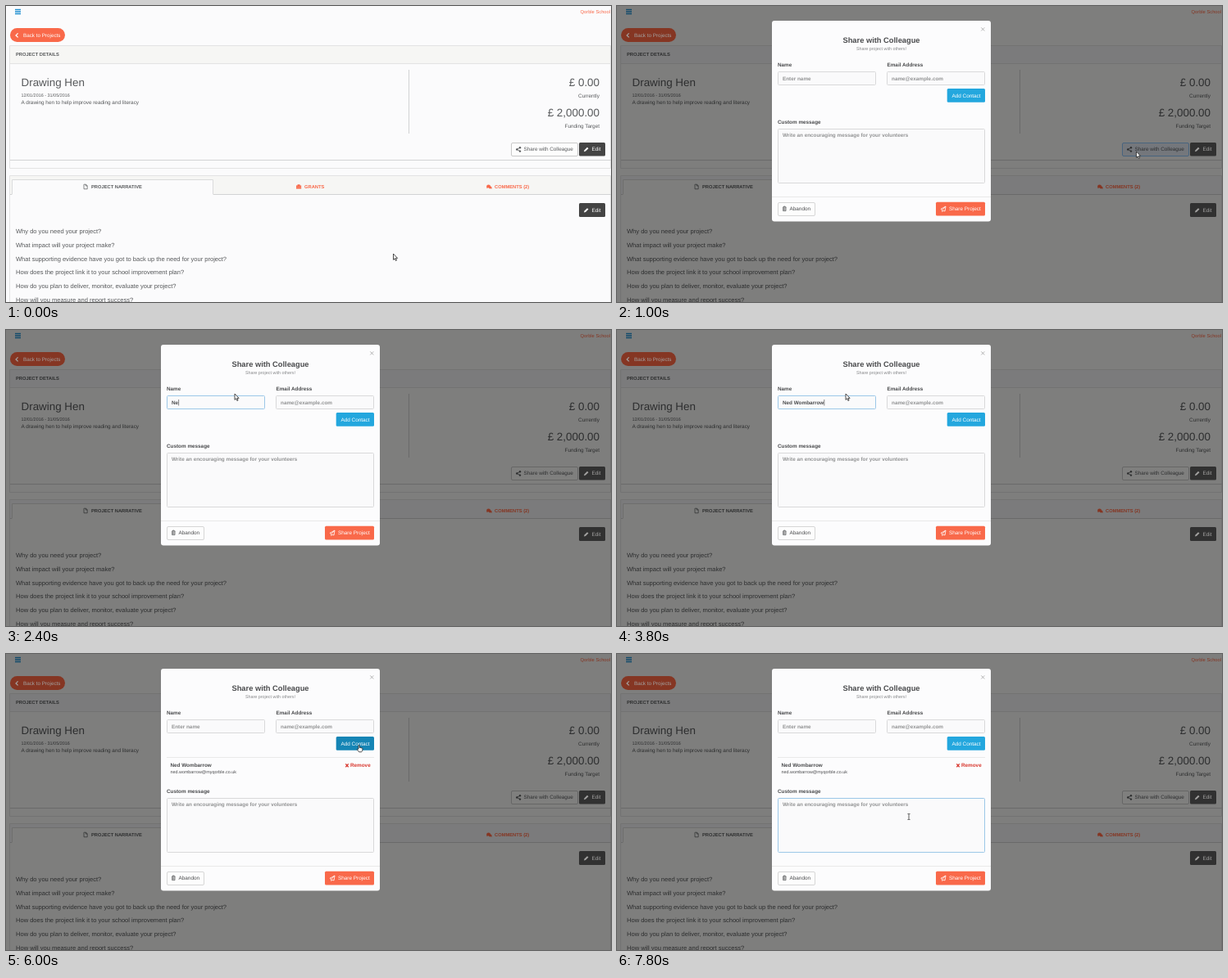
Recreate the animation shown at these times as an HTML page. Size 738 by 362 pixels, loop 8000 ms.

```html
<!DOCTYPE html>
<html lang="en">
<head>
<meta charset="utf-8">
<title>Share a project</title>
<style>
  html, body { margin: 0; width: 100%; height: 100%; overflow: hidden; }
  svg { display: block; width: 738px; height: 362px; }
  text {
    font-family: "Liberation Sans", Arial, sans-serif;
    font-size: 6.4px; fill: var(--ink); text-rendering: geometricPrecision;
  }
  #page {
    --bg: #fbfbfc; --head: #f6f6f4; --line: #e3e3e3; --rule: #d2d3d4;
    --ink: #57595b; --hot: #f9694a; --dark: #444; --label: #fff; --btn: #fdfdfd;
    --edge: #c9c9c9; --menu: #1f8fd0;
  }
  #page.dim {
    --bg: #7e7e7d; --head: #7b7b7c; --line: #727272; --rule: #6a6a6a;
    --ink: #2d2e2f; --hot: #853623; --dark: #313131; --label: #a3a2a1; --btn: #7f7f7e;
    --edge: #666; --menu: #124b6c;
  }
  #page.hover { --btn: #e1e1e1; --edge: #adadad; }
  #page.focus { --btn: #74777c; --edge: #48647f; }
  .bg { fill: var(--bg); }
  .head { fill: var(--head); }
  .line { stroke: var(--line); fill: none; }
  .rule { stroke: var(--rule); fill: none; }
  .hot { fill: var(--hot); }
  .dark { fill: var(--dark); }
  .label { fill: var(--label); }
  .ink { fill: var(--ink); }
  .big { font-size: 13.4px; }
  .ask { font-size: 7.54px; }
  .cap { font-size: 5.75px; font-weight: bold; }
  .tiny { font-size: 5.4px; }
  .bold { font-weight: bold; font-size: 6.35px; }
  .end { text-anchor: end; }
  .mid { text-anchor: middle; }
  #shareBtn { fill: var(--btn); stroke: var(--edge); }
  #modal { --ink: #4a4b4d; --hot: #f9694a; --label: #fff; }
  .field { fill: #fafafb; stroke: #d9d9da; }
  .field.on { stroke: #9cc8e8; }
  .empty { fill: #929394; }
  #addBtn { fill: #23a7de; }
  #addBtn.on { fill: #1585b5; }
  .plain { fill: #fdfdfd; stroke: #d6d6d6; }
  .red { fill: #d8382f; }
  #caret { stroke: #555; stroke-width: .7; }
  .pointer { fill: #fff; stroke: #222; stroke-width: .8; stroke-linejoin: round; }
</style>
</head>
<body>
<svg viewBox="0 0 738 362">
  <defs>
    <path id="pencil" d="M0 6l.6-2L4 .6 5.5 2 2 5.4z"/>
  </defs>

  <g id="page">
    <rect class="bg" width="738" height="362"/>
    <path d="M11 4.5h7M11 7h7M11 9.5h7" style="stroke:var(--menu);stroke-width:1.3"/>
    <text class="hot end" x="737" y="8.7" style="font-size:5.75px">Qorble School</text>

    <rect class="hot" x="5" y="27" width="67" height="17" rx="8.5"/>
    <path d="M14.6 33.4l-2.5 2.5 2.5 2.5" style="fill:none;stroke:var(--label);stroke-width:1.3"/>
    <text class="label" x="21" y="38" style="font-size:6.3px">Back to Projects</text>

    <rect class="head" x="5" y="48" width="733" height="22"/>
    <path class="line" d="M4.500 198.500v-150h733v150zM5 70.500h733"/>
    <text class="cap" x="12" y="61.2">PROJECT DETAILS</text>
    <path class="rule" d="M491.5 78v78M5 188.5h733"/>
    <text class="big" x="18.5" y="98">Drawing Hen</text>
    <text x="18.5" y="110.6" style="font-size:5.45px">12/01/2016 - 31/05/2016</text>
    <text x="18.5" y="119.6">A drawing hen to help improve reading and literacy</text>
    <text class="big end" x="724" y="98">£ 0.00</text>
    <text class="end" x="724" y="112.2">Currently</text>
    <text class="big end" x="724" y="135">£ 2,000.00</text>
    <text class="end" x="724" y="149.2">Funding Target</text>

    <rect id="shareBtn" x="616.5" y="167.5" width="81" height="16" rx="1.5"/>
    <path d="M627 173.3l-4 2.1 4 2.1" style="fill:none;stroke:var(--ink);stroke-width:.8"/>
    <g class="ink"><circle cx="627" cy="173.2" r="1.2"/><circle cx="623.2" cy="175.4" r="1.2"/><circle cx="627" cy="177.6" r="1.2"/></g>
    <text x="631.5" y="177.4" style="font-size:6.35px">Share with Colleague</text>
    <rect class="dark" x="699" y="167" width="32" height="16.5" rx="1.5"/>
    <use href="#pencil" class="label" x="705" y="172.2"/>
    <text class="label" x="714.5" y="177.4">Edit</text>

    <rect class="head" x="5" y="208" width="733" height="22"/>
    <path class="line" d="M4.5 362V207.5h733V362"/>
    <path class="rule" d="M5 230.5h733"/>
    <path class="bg" d="M7 231v-19h246v19z"/>
    <path class="rule" d="M7.5 230.5v-18h245v18" style="stroke-width:.8"/>
    <path d="M95 218.2h2.6l1.6 1.6v4h-4.2zM97.4 218.2v1.8h1.8" style="fill:none;stroke:var(--ink);stroke-width:.7"/>
    <text class="cap" x="104" y="222.8">PROJECT NARRATIVE</text>
    <path class="hot" d="M354 219.6h1.6v-1.4h3v1.4h1.6v1.8h-6.2zM354 221.8h6.2v1.8h-6.2z"/>
    <text class="cap hot" x="364" y="222.8">GRANTS</text>
    <g class="hot"><ellipse cx="588.6" cy="220.4" rx="2.4" ry="1.9"/><ellipse cx="590.6" cy="222" rx="1.9" ry="1.4"/><path d="M586.6 221l-.3 2 2-.8zM591 222.6l1.6 1.4-.2-2z"/></g>
    <text class="cap hot" x="596" y="222.8">COMMENTS (2)</text>

    <rect class="dark" x="699" y="241" width="32" height="17" rx="1.5"/>
    <use href="#pencil" class="label" x="705" y="246.6"/>
    <text class="label" x="714.5" y="251.8">Edit</text>

    <text class="ask" x="12" y="277.7">Why do you need your project?</text>
    <text class="ask" x="12" y="294.6">What impact will your project make?</text>
    <text class="ask" x="12" y="311.5">What supporting evidence have you got to back up the need for your project?</text>
    <text class="ask" x="12" y="328.4">How does the project link it to your school improvement plan?</text>
    <text class="ask" x="12" y="345.3">How do you plan to deliver, monitor, evaluate your project?</text>
    <text class="ask" x="12" y="362.2">How will you measure and report success?</text>
  </g>

  <g id="modal">
    <rect id="sheet" x="189" y="18" width="267" height="245.5" rx="3" fill="#fcfcfd"/>
    <path d="M444.3 26.4l4 4m0-4l-4 4" stroke="#aaa" stroke-width=".9"/>
    <text class="mid" x="322.5" y="45.2" style="font-size:9.3px;font-weight:bold">Share with Colleague</text>
    <text class="mid tiny" x="322.5" y="54.3" style="fill:#858688">Share project with others!</text>
    <text class="bold" x="196" y="73.7">Name</text>
    <text class="bold" x="329.5" y="73.7">Email Address</text>
    <rect id="nameBox" class="field" x="196.5" y="80.5" width="119" height="16" rx="1"/>
    <rect id="mailBox" class="field" x="329.5" y="80.5" width="119" height="16" rx="1"/>
    <text id="nameText" class="bold" x="202" y="90.8"></text>
    <text id="mailText" class="bold" x="335" y="90.8"></text>
    <rect id="addBtn" x="402.7" y="101" width="46.3" height="16.7" rx="1.5"/>
    <text class="label mid" x="426" y="111.6">Add Contact</text>

    <g id="contact">
      <path d="M196 126.5h253" stroke="#e9e9e9"/>
      <text class="bold" x="200.5" y="138.3">Ned Wombarrow</text>
      <text class="tiny" x="200.5" y="145.8">ned.wombarrow@myqorble.co.uk</text>
      <path d="M414.3 134.4l3.4 3.8m0-3.8l-3.4 3.8" stroke="#d8382f" stroke-width="1.3"/>
      <text class="bold red" x="420" y="138.3">Remove</text>
    </g>

    <g id="low">
      <text class="bold" x="196" y="144">Custom message</text>
      <rect id="noteBox" class="field" x="196.5" y="150.5" width="252" height="66" rx="1"/>
      <text class="bold empty" x="202" y="159.8">Write an encouraging message for your volunteers</text>
      <path d="M189 233.5h267" stroke="#e9e9e9"/>
      <rect class="plain" x="196.5" y="240.5" width="45" height="16" rx="1.5"/>
      <path d="M202 246.2h4.6M203.4 246v-.9h1.8v.9M202.6 246.4v4.2h3.4v-4.2M203.7 247.2v2.6M204.9 247.2v2.6" fill="none" stroke="#4a4b4d" stroke-width=".7"/>
      <text x="210.5" y="250.4">Abandon</text>
      <rect class="hot" x="389" y="239.8" width="60" height="16.7" rx="1.5"/>
      <path d="M395 248.4l6-3.4-1 6-2-.8-1.2 1.3v-2zM396.8 249.4l4-4.2" fill="none" stroke="#fff" stroke-width=".8"/>
      <text class="label" x="405" y="250.4">Share Project</text>
    </g>
    <path id="caret"/>
  </g>

  <g id="cursor">
    <path id="arrow" class="pointer" d="M.5 0v7.4l1.7-1.6 1.2 2.7 1.2-.6-1.2-2.5h2.2z"/>
    <path id="hand" class="pointer" d="M2 5V.8q.7-.8 1.3 0v2.6l2.9.6q.9.2.8 1.200l-.5 2.400-.8 1.200H2.600L.2 5.700q.4-1 1.200-.2z"/>
    <path id="beam" d="M-1.500-3.500h1.200l.3.300.3-.3h1.200M0-3.200v6.400M-1.500 3.500h1.200l.3-.3.3.3h1.200" fill="none" stroke="#333" stroke-width=".8"/>
  </g>
</svg>

<script>
  const LOOP = 8000, TICK = 200;
  const NAME = "Ned Wombarrow", MAIL = "ned.wombarrow@myqorble.co.uk";
  const el = id => document.getElementById(id);

  // Each entry: start time in ms, then the value held from there on.
  const PATH = [
    [0, 472, 303], [200, 540, 254], [400, 614, 196], [600, 632, 178],
    [1000, 633, 178], [1200, 560, 156], [1400, 400, 110], [1600, 300, 84], [1800, 278.5, 78],
    [5600, 334, 91], [5800, 428, 111], [6200, 402, 144], [6400, 366, 188], [6600, 356, 199]
  ];
  const NAME_KEYS = [[0, 0], [2400, 2], [2600, 3], [2800, 5], [3000, 6], [3200, 8], [3400, 10], [3600, 12], [3800, 13], [6000, 0]];
  const MAIL_KEYS = [[0, 0], [4600, MAIL.length], [6000, 0]];

  const at = (list, t) => list.filter(k => k[0] <= t).pop();
  const show = (id, on) => { el(id).style.display = on ? "" : "none"; };
  const mark = (id, cls, on) => el(id).classList.toggle(cls, on);

  function fill(id, value, hint) {
    el(id).textContent = value || hint;
    mark(id, "empty", !value);
    return value ? el(id).getComputedTextLength() + .5 : 0;
  }

  function draw(ms) {
    const t = Math.floor(ms % LOOP / TICK) * TICK;
    const within = (a, b) => t >= a && t < b;
    const open = t >= 1000, added = t >= 6000;
    const onName = within(2000, 4000), onMail = within(4000, 6000), onNote = t >= 7400;

    mark("page", "dim", open);
    mark("page", "hover", within(600, 1000));
    mark("page", "focus", within(1000, 1200));
    show("modal", open);
    show("contact", added);
    el("sheet").setAttribute("height", added ? 271.5 : 245.5);
    el("low").setAttribute("transform", `translate(0 ${added ? 26 : 0})`);

    const nameEnd = fill("nameText", NAME.slice(0, at(NAME_KEYS, t)[1]), "Enter name");
    const mailEnd = fill("mailText", MAIL.slice(0, at(MAIL_KEYS, t)[1]), "name@example.com");
    mark("nameBox", "on", onName);
    mark("mailBox", "on", onMail);
    mark("noteBox", "on", onNote);
    mark("addBtn", "on", within(5800, 7400));

    const x = onName ? 202 + nameEnd : onMail ? 335 + mailEnd : 202;
    show("caret", onName || (onMail && !within(5000, 5600)) || within(7400, 7800));
    el("caret").setAttribute("d", `M${x} ${onNote ? 180 : 85}v7.5`);

    const [, cx, cy] = at(PATH, t);
    const hand = within(600, 1000) || within(5800, 6200), beam = t >= 6600;
    el("cursor").setAttribute("transform", `translate(${cx} ${cy})`);
    show("hand", hand);
    show("beam", beam);
    show("arrow", !hand && !beam);
  }

  const start = performance.now();
  function loop() {
    draw(performance.now() - start);
    requestAnimationFrame(loop);
  }
  loop();
</script>
</body>
</html>
```
